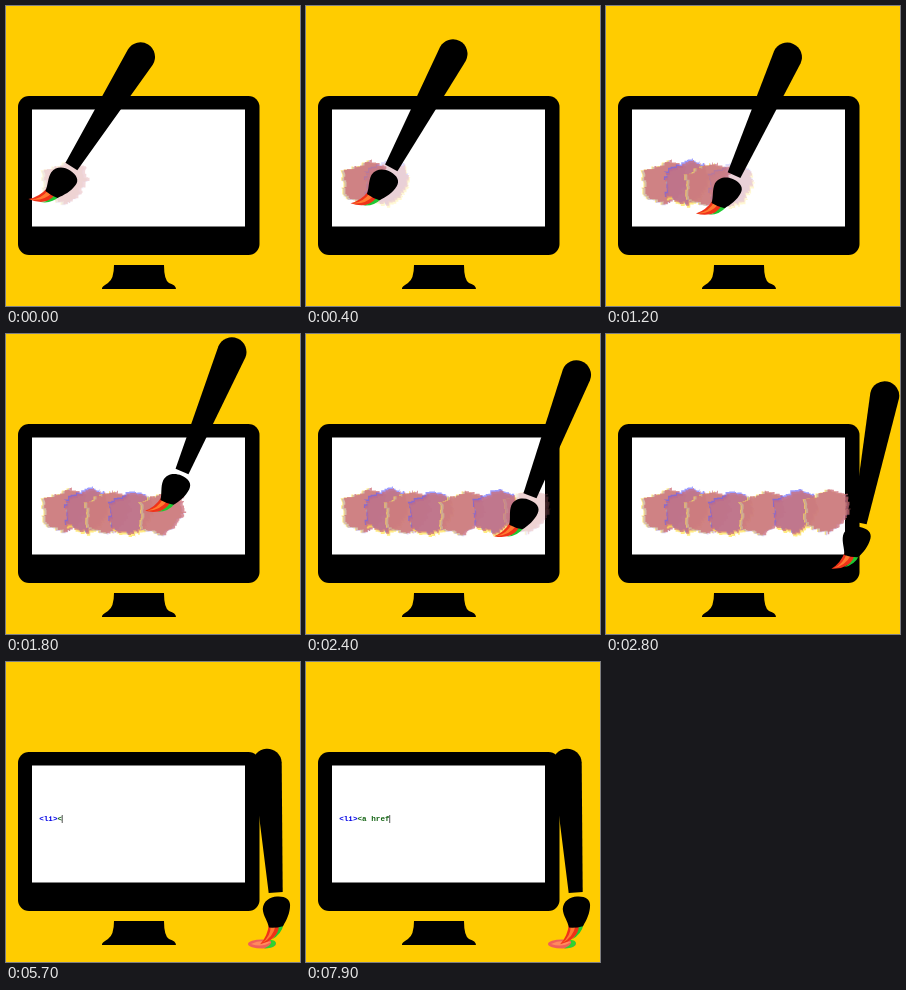
An HTML page that plays this animation: 294x300 px, repeating every 8 s.

```html
<!DOCTYPE html>
<html lang="en">
<head>
<meta charset="utf-8">
<title>Brush and code</title>
<style>
  html, body { margin: 0; width: 100%; height: 100%; overflow: hidden; background: #fc0; }
  svg { display: block; width: 100%; height: 100%; }
  text { font: bold 7.65px "Liberation Mono", "DejaVu Sans Mono", monospace; white-space: pre; }
</style>
</head>
<body>
<svg viewBox="0 0 294 300">
  <rect width="294" height="300" fill="#fc0"/>
  <rect x="12" y="90" width="241.5" height="159" rx="11"/>
  <rect x="26" y="103.5" width="213" height="117" fill="#fff"/>
  <path d="M108 259H158Q158 274 163 277Q170 279 170 283H96Q95 281 102 277Q108 273 108 259Z"/>
  <g id="paint"></g>
  <text x="33.2" y="159"><tspan id="tag" fill="#0000e6"></tspan><tspan id="link" fill="#146414"></tspan></text>
  <rect id="cursor" y="153" width="0.9" height="8" fill="#444"/>
  <g id="puddle">
    <ellipse cx="256" cy="282" rx="14" ry="4.6" fill="#f0605a"/>
    <path d="M258 286.6Q270 286 270 281Q269 277.5 264 278Q268 282 258 286.6Z" fill="#2fd32f"/>
    <path d="M245 282Q254 277 265 280Q256 286 245 282Z" fill="#ff8a5c"/>
  </g>
  <g id="brush">
    <path d="M-9 12Q-11 24 -19 31Q-3 29 6 12Z" fill="#f03218"/>
    <path d="M-7 13Q-8 24 -17 30Q-6 26 -2 13Z" fill="#ff7a30"/>
    <path d="M-7 27Q0 22 1 14L6 12Q3 23 -7 27Z" fill="#1fc832"/>
    <path d="M-14 -4C-13 -12 -6 -15.500 1 -15.500C9 -15.500 14 -12 13.500 -6C13 2 9 9 5 14.500Q-2 16 -9 15C-10 8 -14 3 -14 -4Z"/>
    <path d="M-7 -19.500L-14.600 -149A14.600 14.600 0 0 1 14.600 -149L7 -19.500Z"/>
  </g>
</svg>
<script>
const LOOP = 8000, STEP = 200, LAST_STEP = 17, STROKE_END = 12;
const CHAR = 7.65 * 0.6;
const TAG = "<li>", LINK = "<a href";
const $ = id => document.getElementById(id);
const clamp = (v, lo, hi) => Math.min(hi, Math.max(lo, v));

// Brush poses at rest: [step, x, y, tilt]
const poses = [
  [0, 55, 177, 32.2], [2, 76, 179, 28.4], [6, 120, 187, 24.3],
  [12, 217, 180, 21], [17, 271, 250, -3.8]
];

function poseAt(step) {
  const i = Math.max(1, poses.findIndex(p => p[0] >= step));
  const a = poses[i - 1], b = poses[i];
  const k = (step - a[0]) / (b[0] - a[0]);
  let [x, y, tilt] = [1, 2, 3].map(j => a[j] + (b[j] - a[j]) * k);
  if (step < STROKE_END) y -= step % 2 ? 28 : 0;
  else x += 12 * Math.sin(Math.PI * k);
  return { x, y, tilt };
}

function random(seed) {
  return () => (seed = (seed * 16807) % 2147483647) / 2147483647;
}

const outline = [[-20, -12], [4, -23], [20, -17], [23, -2], [15, 13], [2, 21], [-19, 13]];

// Stair-stepped, ragged patch outline
function raggedPath(seed, dx, dy) {
  const rnd = random(seed);
  let d = "";
  outline.forEach(([x, y], i) => {
    const [nx, ny] = outline[(i + 1) % outline.length];
    for (let j = 0; j < 8; j++) {
      const px = (x + (nx - x) * j / 8 + dx + rnd() * 3 - 1.5).toFixed(1);
      const py = (y + (ny - y) * j / 8 + dy + rnd() * 3 - 1.5).toFixed(1);
      d += d ? `H${px}V${py}` : `M${px} ${py}`;
    }
  });
  return d + "Z";
}

function patch(index) {
  const { x, y } = poseAt(index * 2);
  const layer = (fill, opacity, dx, dy) =>
    `<path d="${raggedPath(77 + index * 911, dx, dy)}" fill="${fill}" opacity="${opacity}"/>`;
  const blue = index % 2 ? layer("#5a5aff", 0.6, 0, -1.5) : layer("#7a5aff", 0.3, -1, 1);
  return `<g transform="translate(${x + 3} ${y * 0.4 + 106})">` +
    layer("#ffe45a", 0.75, index % 2 ? 2 : -2, index % 2 ? 2 : 0.5) +
    blue + layer("#cd6e78", 0.75, 1, 0) + "</g>";
}

$("paint").innerHTML = Array.from({ length: 7 }, (_, i) => patch(i)).join("");
const patches = [...$("paint").children];

function typedCount(t) {
  const count = (start, max) => clamp(Math.floor((t - start) / STEP) + 1, 0, max);
  return count(4900, 7) + count(7300, 4);
}

function render(t) {
  const step = Math.min(LAST_STEP, Math.floor(t / STEP));
  const { x, y, tilt } = poseAt(step);
  $("brush").setAttribute("transform", `translate(${x} ${y}) rotate(${tilt})`);

  const done = step === LAST_STEP;
  $("puddle").style.display = done ? "" : "none";
  $("paint").style.display = done ? "none" : "";
  patches.forEach((p, i) => {
    p.style.opacity = step > i * 2 ? 1 : step === i * 2 ? 0.35 : 0;
  });

  const n = typedCount(t);
  $("tag").textContent = TAG.slice(0, n);
  $("link").textContent = LINK.slice(0, Math.max(0, n - TAG.length));
  const blinkOff = (t >= 3900 && t < 4400) || (t >= 6300 && t < 6800);
  $("cursor").style.display = done && !blinkOff ? "" : "none";
  $("cursor").setAttribute("x", 32.8 + n * CHAR);
}

const start = performance.now();
function tick() {
  render((performance.now() - start) % LOOP);
  requestAnimationFrame(tick);
}
tick();
</script>
</body>
</html>
```
